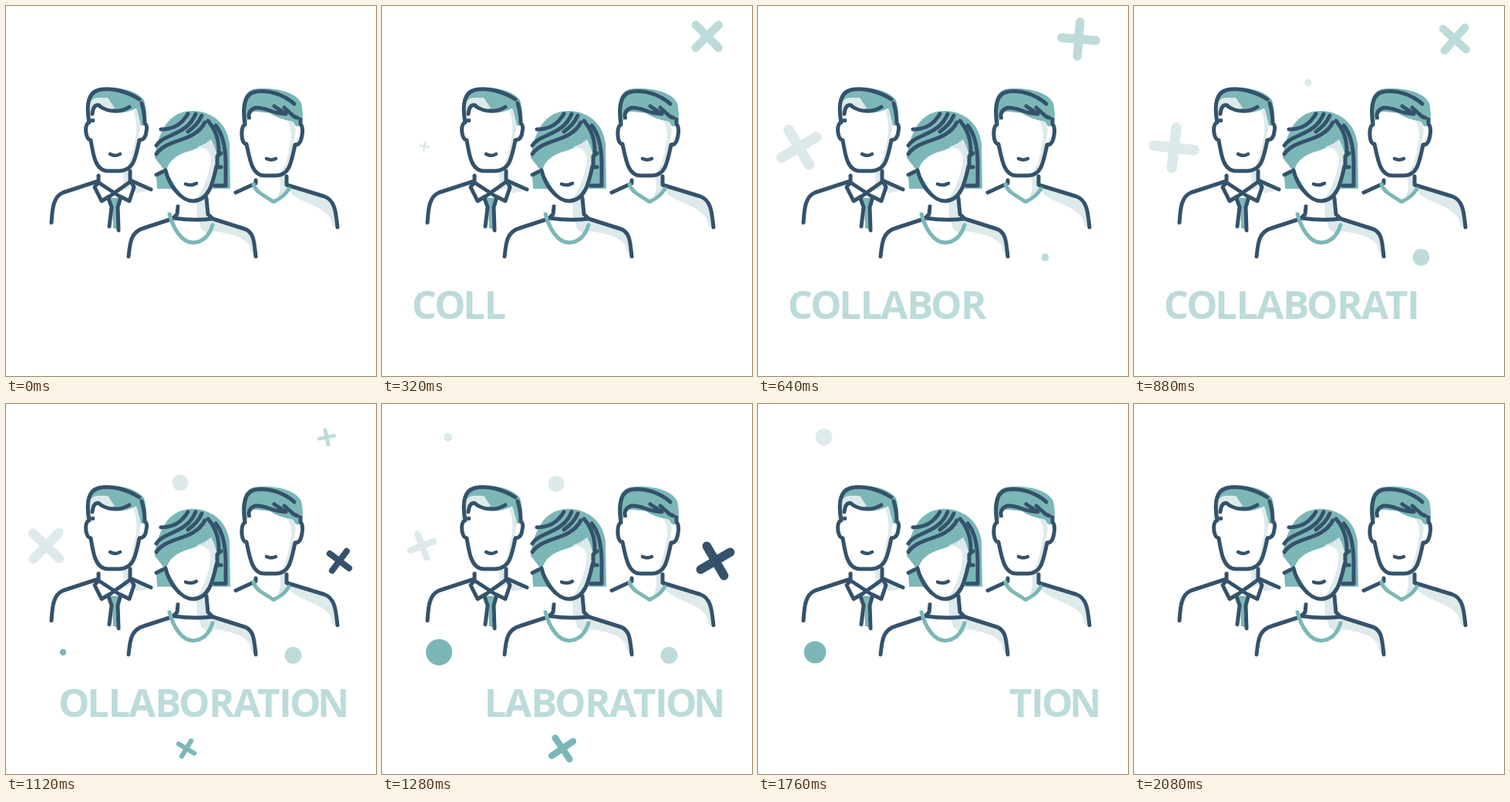
An HTML page with a canvas for the animation above (2160 ms loop, 480x480 px).

```html
<!DOCTYPE html>
<html lang="en">
<head>
<meta charset="utf-8">
<title>Collaboration</title>
<style>
html, body { margin: 0; width: 100%; height: 100%; overflow: hidden; background: #fff; }
canvas { display: block; width: 480px; height: 480px; }
</style>
</head>
<body>
<canvas id="stage" width="480" height="480"></canvas>
<script>
const ctx = document.getElementById('stage').getContext('2d');
const DARK = '#34526b', TEAL = '#7cb7b7', LIGHT = '#bddbdb', PALE = '#dde9ea', WHITE = '#fff';
const STEP = 80, STEPS = 27;
const WORD = 'COLLABORATION';
// ink centre of each letter
const CENTERS = [55, 88, 121, 148.5, 177, 211, 244, 282, 313, 341, 362.5, 388, 424.5];

function fill(color, d) {
  ctx.fillStyle = color;
  ctx.fill(new Path2D(d));
}

function line(color, d, width = 5) {
  ctx.strokeStyle = color;
  ctx.lineWidth = width;
  ctx.lineCap = ctx.lineJoin = 'round';
  ctx.stroke(new Path2D(d));
}

function dot(color, x, y, r) {
  ctx.fillStyle = color;
  ctx.beginPath();
  ctx.arc(x, y, r, 0, Math.PI * 2);
  ctx.fill();
}

function leftMan() {
  // hair and shading
  fill(TEAL, 'M105 150 C101 120 110 106 130 106 C152 105 171 111 179 122 C183 135 183 146 179 155 L172 155 L168 135 C150 143 132 138 121 128 L113 137 Z');
  fill(PALE, 'M107 141 C106 129 109 120 118 119 L132 119 L141 132 L134 136 L121 128 L113 137 L111 150 Z');
  fill(WHITE, 'M111 145 L114 134 Q118 128 124 132 C139 143 155 139 169 133 L174 160 L166 198 Q160 213 143 213 Q122 214 117 202 Z');
  fill(PALE, 'M165 136 L170 134 L175 154 L167 200 Q163 211 156 212 Q165 195 169 165 Q170 145 165 136 Z');
  fill(PALE, 'M152 215 L162 215 L163 226 L188 238 L170 243 L161 236 L148 240 Q154 231 152 215 Z');
  fill(TEAL, 'M133 249 L149 249 L146 260 L148 291 L139 288 L138 261 Z');
  // head
  line(DARK, 'M108 151 C104 130 106 113 120 109 C137 105 157 111 173 121');
  line(DARK, 'M112 140 C113 130 118 125 123 131 C134 138 149 138 160 131');
  line(DARK, 'M176 126 Q180 139 180 152 Q184 155 182 163 Q181 173 174 174');
  line(DARK, 'M106 152 C102 157 103 173 110 174 C113 193 116 214 132 214 L146 214 C165 214 168 199 173 174');
  dot(DARK, 112.5, 148.5, 2.7);
  line(DARK, 'M135 192 Q142 196 148 192', 4.5);
  // collar, tie, shoulders
  line(DARK, 'M120 220 V227 L74 242 C62 247 60 261 59 281');
  line(DARK, 'M161 214 V226 L188 238');
  line(DARK, 'M120 229 L149 248 M161 228 L133 248 M118 231 L115 235 L124 253 L134 247 M163 229 L166 235 L160 253 L148 247');
  line(DARK, 'M133 250 L137 261 L134 286 M148 251 L145 261 L146 291');
}

function rightMan() {
  fill(TEAL, 'M308 154 C303 123 309 107 329 107 C355 106 377 113 383 126 C386 139 385 149 383 156 L376 156 L372 150 Q352 146 341 139 L320 137 Q315 145 314 154 Z');
  fill(WHITE, 'M312 154 Q314 139 323 137 L342 139 Q356 148 371 150 L375 170 L368 207 Q360 220 344 220 Q325 220 319 204 Z');
  fill(PALE, 'M364 148 L372 150 L376 160 L369 207 Q364 217 356 218 Q367 200 370 170 Q370 154 364 148 Z');
  fill(PALE, 'M355 221 L364 221 L366 233 L414 249 Q429 256 430 288 L424 286 C421 268 408 262 390 255 Q374 248 367 240 L352 249 Q358 236 355 221 Z');
  line(DARK, 'M310 154 C306 128 311 112 325 111 C341 109 359 114 374 127');
  line(DARK, 'M315 142 Q316 134 324 132 C337 131 346 140 363 140 L348 130 M361 132 L370 140 Q373 144 378 145');
  line(DARK, 'M382 147 L382 153 Q386 157 384 168 Q382 180 376 180');
  line(DARK, 'M309 154 C304 160 305 179 312 179 C316 198 319 220 335 220 L350 220 C368 220 370 203 375 180');
  dot(DARK, 315.5, 145, 2.5);
  line(DARK, 'M338 198 Q344 201 350 198', 4.5);
  line(DARK, 'M324 226 V230 L298 242');
  line(DARK, 'M364 221 V232 L413 247 C427 252 428 268 430 287');
  line(TEAL, 'M321 231 Q323 238 330 243 L347 254 Q362 247 367 237');
}

function woman() {
  fill(TEAL, 'M196 237 L195 220 L204 211 L193 197 Q194 180 202 163 Q215 136 242 136 C269 137 287 153 290 179 L291 237 H266 L243 253 L213 237 Z');
  fill(WHITE, 'M208 214 Q211 198 232 190 Q254 184 265 174 Q274 186 274 204 L268 229 Q260 252 243 253 Q230 251 218 231 Z');
  fill(PALE, 'M247 183 Q259 180 266 173 Q274 186 274 205 L267 231 Q258 249 247 252 Q263 225 266 200 Q266 184 247 183 Z');
  fill(PALE, 'M247 254 L260 249 L262 273 L312 290 Q324 294 325 325 Q318 323 317 315 Q314 298 270 292 L264 298 L253 289 Q250 278 248 276 Z');
  // strands
  line(DARK, 'M201 160 C218 160 228 153 236 140');
  line(DARK, 'M195 181 C205 165 234 169 246 140');
  line(DARK, 'M195 192 C209 171 244 178 258 151');
  line(DARK, 'M236 163 Q249 154 254 142');
  line(DARK, 'M195 219 L203 215');
  line(DARK, 'M262 149 Q277 166 276 191');
  line(DARK, 'M272 155 Q284 169 285 202 L285 233 H271');
  // face
  line(DARK, 'M207 213 C211 231 226 253 243 253 C263 252 268 231 273 208');
  line(DARK, 'M279 191 L274 195 V209 L279 209');
  line(DARK, 'M233 231 Q240 234 247 230', 4.5);
  // neck and shoulders
  line(DARK, 'M223 260 L222 270 L216 276 L179 288 C162 293 161 306 159 325');
  line(DARK, 'M260 249 L262 270 L268 276 L309 289 C322 293 322 307 324 325');
  line(DARK, 'M217 275 Q243 279 268 276');
  line(TEAL, 'M212 270 C217 289 228 307 243 307 Q261 306 268 284');
}

const ease = p => Math.sin(Math.min(1, Math.max(0, p)) * Math.PI / 2);

// grows from a to b, rests, shrinks from c to d
const size = (n, [a, b, c, d]) => Math.min(ease((n - a) / (b - a)), ease((d - n) / (d - c)));

const CROSSES = [
  { x: 416, y: 43, r: 28, color: LIGHT, life: [.5, 5, 9, 16], spin: 12.3, from: .3, dx: 8, dy: -5 },
  { x: 52, y: 184, r: 33, color: PALE, life: [3.4, 8, 12, 19], spin: 12.4, from: 3.2, dx: 3, dy: -2 },
  { x: 432.5, y: 203.5, r: 28, color: DARK, life: [12, 16, 17.5, 22], spin: 11.5, from: 10.8, dx: 0, dy: 0 },
  { x: 234, y: 447, r: 21, color: TEAL, life: [12, 16, 16.7, 20.1], spin: 12.4, from: 11.5, dx: 0, dy: 0 }
];
const DOTS = [
  { x: 372.5, y: 326, r: 11, color: LIGHT, life: [7, 10.3, 16.5, 21] },
  { x: 226, y: 102, r: 10.5, color: PALE, life: [10, 13.5, 17, 20.3], drift: .85 },
  { x: 74, y: 322, r: 19, color: TEAL, life: [13.5, 17, 19.5, 25] },
  { x: 85.5, y: 43, r: 12.7, color: PALE, life: [15, 18.5, 20.5, 25] }
];

function cross(m, n) {
  const r = m.r * size(n, m.life);
  if (r < .5) return;
  const w = r * .41, h = r - w / 2;
  // slides into place while young
  const shift = 1 - ease((n - m.from - 3) / 4);
  ctx.save();
  ctx.translate(m.x + m.dx * shift, m.y + m.dy * shift);
  ctx.rotate((n - m.from) * m.spin * Math.PI / 180);
  line(m.color, `M${-h} 0 H${h} M0 ${-h} V${h}`, w);
  ctx.restore();
}

function disc(m, n) {
  const r = m.r * size(n, m.life);
  if (r > .3) dot(m.color, m.x, m.y + (m.drift || 0) * (n - 14), r);
}

function word(n) {
  ctx.font = '700 51px "Open Sans", Roboto, sans-serif';
  ctx.textAlign = 'left';
  ctx.textBaseline = 'alphabetic';
  ctx.fillStyle = LIGHT;
  for (let i = Math.max(0, n - WORD.length); i < Math.min(n, WORD.length); i++) {
    const box = ctx.measureText(WORD[i]);
    const mid = (box.actualBoundingBoxRight - box.actualBoundingBoxLeft) / 2;
    ctx.fillText(WORD[i], CENTERS[i] - mid, 406);
  }
}

function draw() {
  const n = Math.floor(performance.now() / STEP) % STEPS;
  ctx.fillStyle = WHITE;
  ctx.fillRect(0, 0, 480, 480);
  leftMan();
  rightMan();
  woman();
  CROSSES.forEach(m => cross(m, n));
  DOTS.forEach(m => disc(m, n));
  word(n);
  requestAnimationFrame(draw);
}
draw();
</script>
</body>
</html>
```
